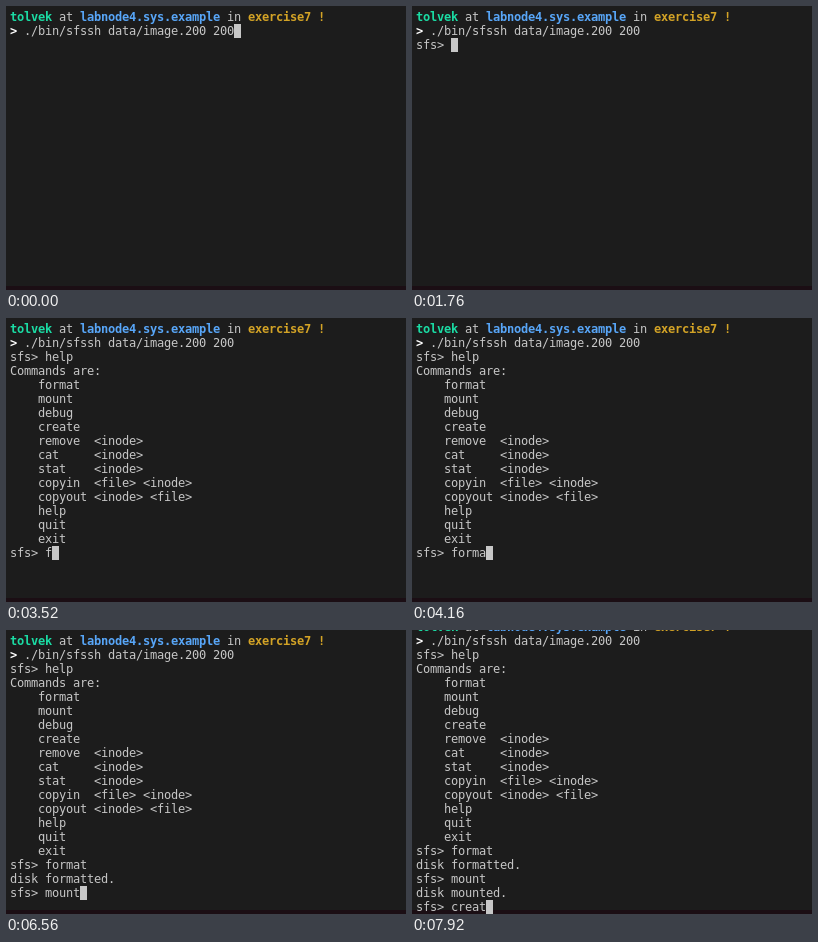
Recreate the animation shown at these times as an HTML page with a canvas. Size 400 px wide and 284 px high, loop 8 s.

```html
<!DOCTYPE html>
<html lang="en">
<head>
<meta charset="utf-8">
<title>Terminal session</title>
<style>
  html, body { margin: 0; width: 100%; height: 100%; overflow: hidden; background: #1c1c1c; }
  canvas { display: block; }
</style>
</head>
<body>
<canvas id="screen" width="400" height="284"></canvas>
<script>
const ctx = document.getElementById('screen').getContext('2d');
const LOOP = 8000, CELL = 7, LINE = 14, PAD = 4, ROWS = 20;
const FONT = '12px "DejaVu Sans Mono", monospace';
const GREY = '#c7c7c7';

const header = [
  ['tolvek', '#1bdca4', true], [' at ', GREY],
  ['labnode4.sys.example', '#58a6f8', true], [' in ', GREY],
  ['exercise7 !', '#d3a326', true]
];

const help = `
Commands are:
    format
    mount
    debug
    create
    remove  <inode>
    cat     <inode>
    stat    <inode>
    copyin  <file> <inode>
    copyout <inode> <file>
    help
    quit
    exit`;

const prompt = '\nsfs> ';
const typed = (start, step, word) => [...word].map((c, i) => [start + i * step, c]);

// Each entry appends its text to the terminal at the given time.
const session = [
  [0, '> ./bin/sfssh data/image.200 200'],
  [400, prompt],
  ...typed(2240, 160, 'help'),
  [3040, help + prompt],
  ...typed(3440, 160, 'forma'), [4320, 't'],
  [4640, '\ndisk formatted.' + prompt],
  ...typed(5280, 160, 'mount'),
  [6720, '\ndisk mounted.' + prompt],
  [7440, 'c'], [7760, 'rea'], [7920, 't']
];

function write(text, col, y, color, bold) {
  ctx.font = (bold ? 'bold ' : '') + FONT;
  ctx.fillStyle = color;
  [...text].forEach((c, i) => ctx.fillText(c, PAD + (col + i) * CELL, y + 11));
}

function draw(time) {
  const lines = session.filter(([at]) => at <= time).map(([, text]) => text).join('').split('\n');
  const top = PAD - Math.max(0, lines.length + 1 - ROWS) * LINE;

  ctx.fillStyle = '#1c1c1c';
  ctx.fillRect(0, 0, 400, 284);
  ctx.fillStyle = '#1b0e14';
  ctx.fillRect(0, 280, 400, 4);

  let col = 0;
  for (const [text, color, bold] of header) {
    write(text, col, top, color, bold);
    col += text.length;
  }
  lines.forEach((line, i) => {
    const y = top + (i + 1) * LINE;
    if (i === 0) {
      write('>', 0, y, '#ffffff', true);
      write(line.slice(1), 1, y, GREY);
    } else {
      write(line, 0, y, GREY);
    }
  });

  ctx.fillStyle = GREY;
  ctx.fillRect(PAD + lines.at(-1).length * CELL, top + lines.length * LINE, CELL, LINE);
}

const start = performance.now();
function tick() {
  draw((performance.now() - start) % LOOP);
  requestAnimationFrame(tick);
}
tick();
</script>
</body>
</html>
```
